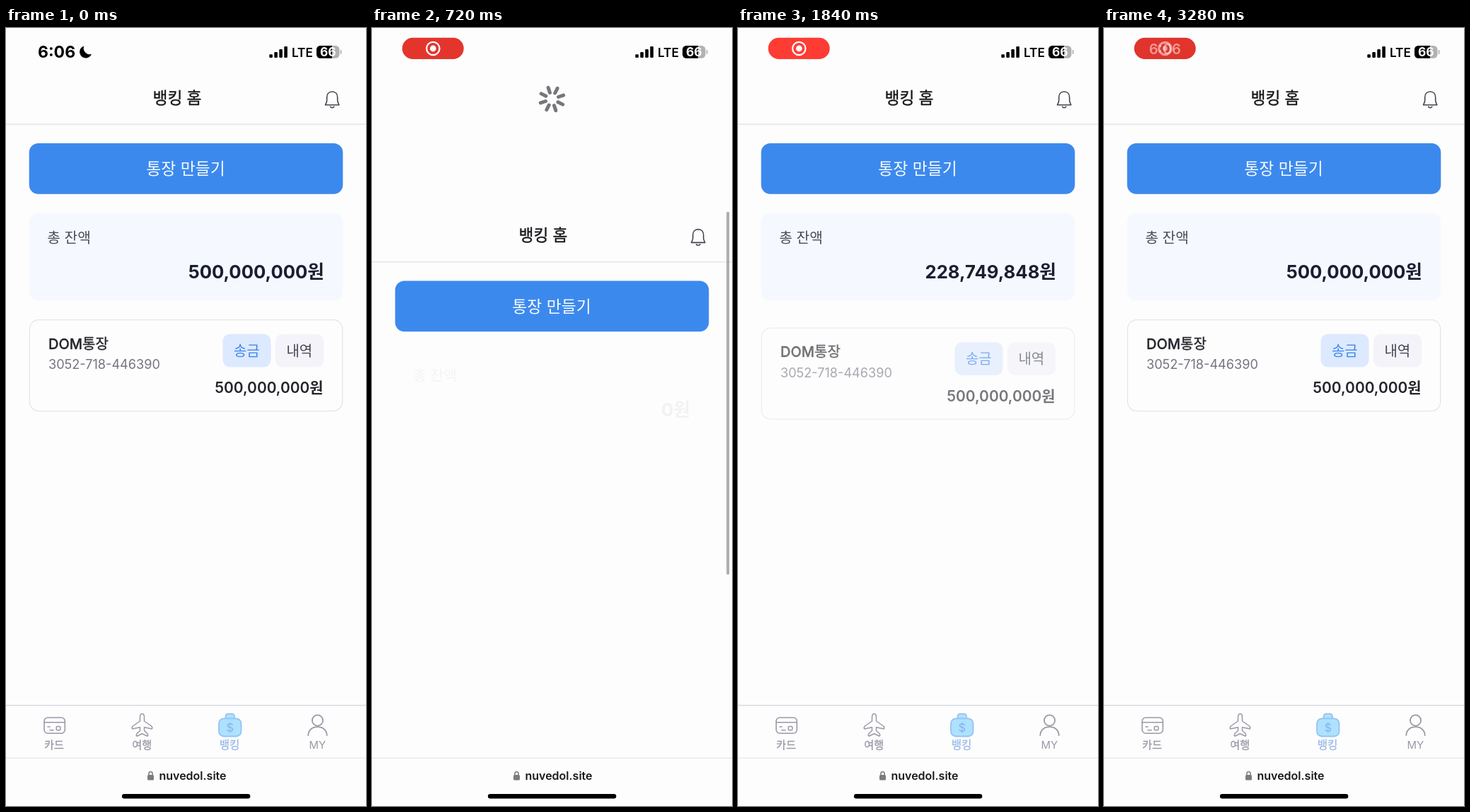
Animation, 509 px wide and 1100 px high, one loop 3360 ms. Source, as an HTML page with a canvas:

```html
<!DOCTYPE html>
<html lang="ko">
<head>
<meta charset="utf-8">
<title>Banking home</title>
<style>
html, body { margin: 0; width: 100%; height: 100%; overflow: hidden; background: #fdfdfd; }
canvas { display: block; width: 509px; height: 1100px; }
</style>
</head>
<body>
<canvas id="stage"></canvas>
<script>
const W = 509, H = 1100, LOOP = 3360, STEP = 80;
const BG = '#fdfdfd', BLUE = '#3c89ee', GRAY = '#9a9aa7';
const FONT = 'Inter, "Noto Sans CJK KR", "Noto Sans CJK", sans-serif';
const RELEASE = 620, RELOAD = 700, COUNT_START = 1712.400428;
const BALANCE = 5e8;

const canvas = document.getElementById('stage');
const c = canvas.getContext('2d');
const dpr = window.devicePixelRatio || 1;
canvas.width = W * dpr;
canvas.height = H * dpr;

const clamp = v => Math.min(1, Math.max(0, v));
const ramp = (t, start, length) => clamp((t - start) / length);
const smooth = p => p * p * (3 - 2 * p);
const easeOut = (p, power) => 1 - (1 - p) ** power;
const won = n => Math.round(n).toLocaleString('en-US') + '원';

function text(str, x, y, size, weight, color, align = 'center') {
  c.font = `${weight} ${size}px ${FONT}`;
  c.textAlign = align;
  c.fillStyle = color;
  c.fillText(str, x, y);
  // Hangul has no medium cut, so a hairline thickens it.
  if (weight === 500) {
    c.strokeStyle = color;
    c.lineWidth = 0.35;
    c.strokeText(str, x, y);
  }
}

function box(x, y, w, h, r, fill, stroke, line = 1.2) {
  c.beginPath();
  c.roundRect(x, y, w, h, r);
  if (fill) { c.fillStyle = fill; c.fill(); }
  if (stroke) { c.strokeStyle = stroke; c.lineWidth = line; c.stroke(); }
}

function circle(x, y, r, fill, stroke, line) {
  box(x - r, y - r, 2 * r, 2 * r, r, fill, stroke, line);
}

function outline(d, color, width) {
  c.strokeStyle = color;
  c.lineWidth = width;
  c.stroke(new Path2D(d));
}

function layer(alpha, dy, draw) {
  if (alpha <= 0) return;
  c.save();
  c.globalAlpha *= alpha;
  c.translate(0, dy);
  draw();
  c.restore();
}

// Drag down, then a critically damped return.
function pullOffset(t) {
  if (t < RELEASE) return 289.3 * smooth(ramp(t, 30, 540));
  const x = 0.01172 * (t - RELEASE);
  const y = 289.3 * (1 + x) * Math.exp(-x);
  return y < 0.3 ? 0 : y;
}

function spinner(t, offset) {
  const scale = ramp(-t, -905, 180);
  if (!scale || offset < 1) return;
  const shown = t < RELEASE ? 8 * clamp((offset - 40) / 160) : 8;
  c.save();
  c.translate(254.5, 100.5);
  c.scale(scale, scale);
  c.rotate((14 + Math.max(0, t - 560) * 0.36) * Math.PI / 180);
  c.lineWidth = 5;
  c.strokeStyle = '#77777b';
  for (let i = 0; i < 8; i++) {
    c.globalAlpha = clamp(shown - i);
    c.beginPath();
    c.moveTo(0, -9.5);
    c.lineTo(0, -17);
    c.stroke();
    c.rotate(Math.PI / 4);
  }
  c.restore();
}

function header() {
  text('뱅킹 홈', 242, 106.7, 22.8, 500, '#18181c');
  outline('M461.2 90c-5 0-7.5 3.6-7.5 8v4c0 3-1.2 4.4-2.2 6.7h19.4c-1-2.3-2.2-3.7-2.2-6.7v-4c0-4.4-2.5-8-7.5-8z' +
    'M458.6 111.2a2.7 1.9 0 0 0 5.2 0', '#44464f', 1.6);
  c.fillStyle = '#e3e3e7';
  c.fillRect(0, 135.5, W, 1.3);
  box(32.7, 162.9, 443.6, 71.8, 13, BLUE);
  text('통장 만들기', 254, 207.3, 22.8, 400, '#f8fbff');
}

function total(amount) {
  box(32.7, 261.6, 443.6, 124, 13, '#f5f9ff');
  text('총 잔액', 58.2, 304.4, 20.3, 400, '#4a4d59', 'left');
  text(won(amount), 450, 354.2, 25.7, 700, '#1c1e31', 'right');
}

function account() {
  box(33.4, 412.6, 442.3, 129, 13, BG, '#e3e4e8');
  text('DOM통장', 60, 453.5, 20, 500, '#24252c', 'left');
  text('3052-718-446390', 60, 482.4, 18.1, 400, '#73757f', 'left');
  box(306.5, 432.8, 68, 46.7, 10, '#dde9fe');
  text('송금', 340.3, 464, 20, 400, BLUE);
  box(381, 432.8, 68, 46.7, 10, '#f3f3f9');
  text('내역', 414.8, 464, 20, 400, '#43454f');
  text(won(BALANCE), 448.5, 516.3, 20.9, 600, '#24252c', 'right');
}

function tabs() {
  c.fillStyle = BG;
  c.fillRect(0, 957, W, 400);
  c.fillStyle = '#d3d6de';
  c.fillRect(0, 957, W, 1.3);

  box(54, 975, 29.3, 22.2, 5, null, GRAY, 1.6);
  outline('M54 981.7h29.3M59 988h3M62 992.7h5', GRAY, 1.6);
  box(71.2, 987.5, 5.6, 5.2, 1.2, null, GRAY, 1.5);

  outline('M192.5 969.5c-2 0-3 2.8-3 5.5v5l-9.5 6.5q-2.6 2-1.4 4.5l10.9-2.2v4.7l-4.6 4.2q-1.3 1.8.2 3.5l7.4-3.4' +
    ' 7.4 3.4q1.5-1.7.2-3.5l-4.6-4.2v-4.7l10.9 2.2q1.2-2.5-1.4-4.5l-9.5-6.5v-5c0-2.7-1-5.5-3-5.5z', GRAY, 1.5);

  box(310.5, 969.7, 12.5, 12, 3.5, '#aee1fe', '#94c3f3', 1.8);
  box(301, 976.3, 31.5, 25.2, 7, '#aee1fe', '#94c3f3', 1.8);
  text('$', 316.7, 994.7, 16.5, 400, '#83b2ec');

  circle(440.5, 979, 7.6, null, GRAY, 1.8);
  outline('M427.3 1000c.3-7.5 6-11.8 13.2-11.8s12.9 4.3 13.2 11.8', GRAY, 1.8);

  text('카드', 68, 1019.2, 15.2, 500, GRAY);
  text('여행', 192.3, 1019.2, 15.2, 500, GRAY);
  text('뱅킹', 316, 1019.2, 15.6, 500, '#9dbbe9');
  text('MY', 440.3, 1019, 15, 400, GRAY);
}

function addressBar(t) {
  c.fillStyle = BG;
  c.fillRect(0, 1032, W, 68);
  c.fillStyle = '#e5e5e8';
  c.fillRect(0, 1031.7, W, 1.2);
  box(200, 1056, 9, 7.6, 1.5, '#7b7b80');
  outline('M201.9 1057v-2.6a2.6 2.8 0 0 1 5.2 0v2.6', '#7b7b80', 1.5);
  text('nuvedol.site', 264, 1063, 16, 600, '#19191b');
  box(163.9, 1082.9, 181.4, 6.5, 3.2, '#000');

  const shown = 0.27 * ramp(t, 800, 80) + 0.5 * ramp(t, 880, 160);
  layer(shown * (1 - ramp(t, 1040, 120)), 0, () => {
    c.fillStyle = BLUE;
    c.fillRect(0, 1032, 51 + 458 * smooth(ramp(t, 880, 160)), 3.5);
  });
}

function clock() {
  text('6:06', 45, 42, 23, 700, '#000', 'left');
  c.fillStyle = '#000';
  c.fill(new Path2D('M110.3 25.4a8.7 8.7 0 1 0 10.7 11.3a8.6 8.6 0 0 1-10.7-11.3z'));
}

function recordPill(t) {
  const pulse = clamp(0.55 * (1 - Math.cos((t - 1030) / 2050 * 2 * Math.PI)));
  const mix = (a, b) => Math.round(a + (b - a) * pulse);
  const swap = ramp(t, 3160, 240);
  box(42.7, 13.8, 87, 30.2, 15.1, `rgb(${mix(220, 255)},${mix(51, 60)},${mix(43, 52)})`);
  layer(swap, 0, () => text('6:06', 86.3, 36.5, 20, 600, '#fff'));
  layer(1 - swap, 0, () => {
    circle(86.3, 29, 9.2 - swap, null, '#fff', 2.3 + 2 * swap);
    circle(86.3, 29, 4.4 - 2 * swap, '#fff');
  });
}

function statusBar(t) {
  if (t < STEP) clock();
  else layer(ramp(t, 0, 160), 0, () => recordPill(t));

  [4.7, 8, 12, 16].forEach((h, i) => box(372.3 + 7 * i, 42 - h, 4.6, h, 1.3, '#000'));
  text('LTE', 404, 40.6, 17.2, 600, '#000', 'left');

  c.save();
  c.beginPath();
  c.roundRect(439, 25, 32.5, 17.8, 5.5);
  c.clip();
  c.fillStyle = '#b2b2b5';
  c.fillRect(439, 25, 33, 18);
  c.fillStyle = '#000';
  c.fillRect(439, 25, 22, 18);
  c.restore();
  box(472.7, 31, 1.8, 6, 0.9, '#b2b2b5');
  text('66', 455.3, 40.3, 17.5, 700, '#fff');
}

function scrollbar(t, offset) {
  layer(ramp(t, 40, 120) * (1 - ramp(t, 660, 160)), 0, () =>
    box(501.2, 65 + offset, 4, 708 - offset, 2, '#7d7d80'));
}

function draw(t) {
  const offset = pullOffset(t);
  const reloaded = t >= RELOAD;
  const count = reloaded ? easeOut(ramp(t, COUNT_START, 900), 4) : 1;
  const totalAlpha = reloaded ? easeOut(ramp(t, RELOAD, 800), 2) : 1;
  const cardIn = reloaded ? easeOut(ramp(t, COUNT_START, 335), 2) : 1;

  c.setTransform(dpr, 0, 0, dpr, 0, 0);
  c.lineCap = c.lineJoin = 'round';
  c.fillStyle = BG;
  c.fillRect(0, 0, W, H);

  spinner(t, offset);
  layer(1, offset, () => {
    c.fillStyle = BG;
    c.fillRect(0, 62, W, H);
    header();
    layer(totalAlpha, 0, () => total(BALANCE * count));
    layer(cardIn, 30 * (1 - cardIn), account);
    tabs();
  });
  scrollbar(t, offset);
  addressBar(t);
  statusBar(t);
}

const begin = performance.now();
function tick() {
  const t = (performance.now() - begin) % LOOP;
  draw(Math.floor(t / STEP) * STEP);
  requestAnimationFrame(tick);
}
tick();
</script>
</body>
</html>
```
